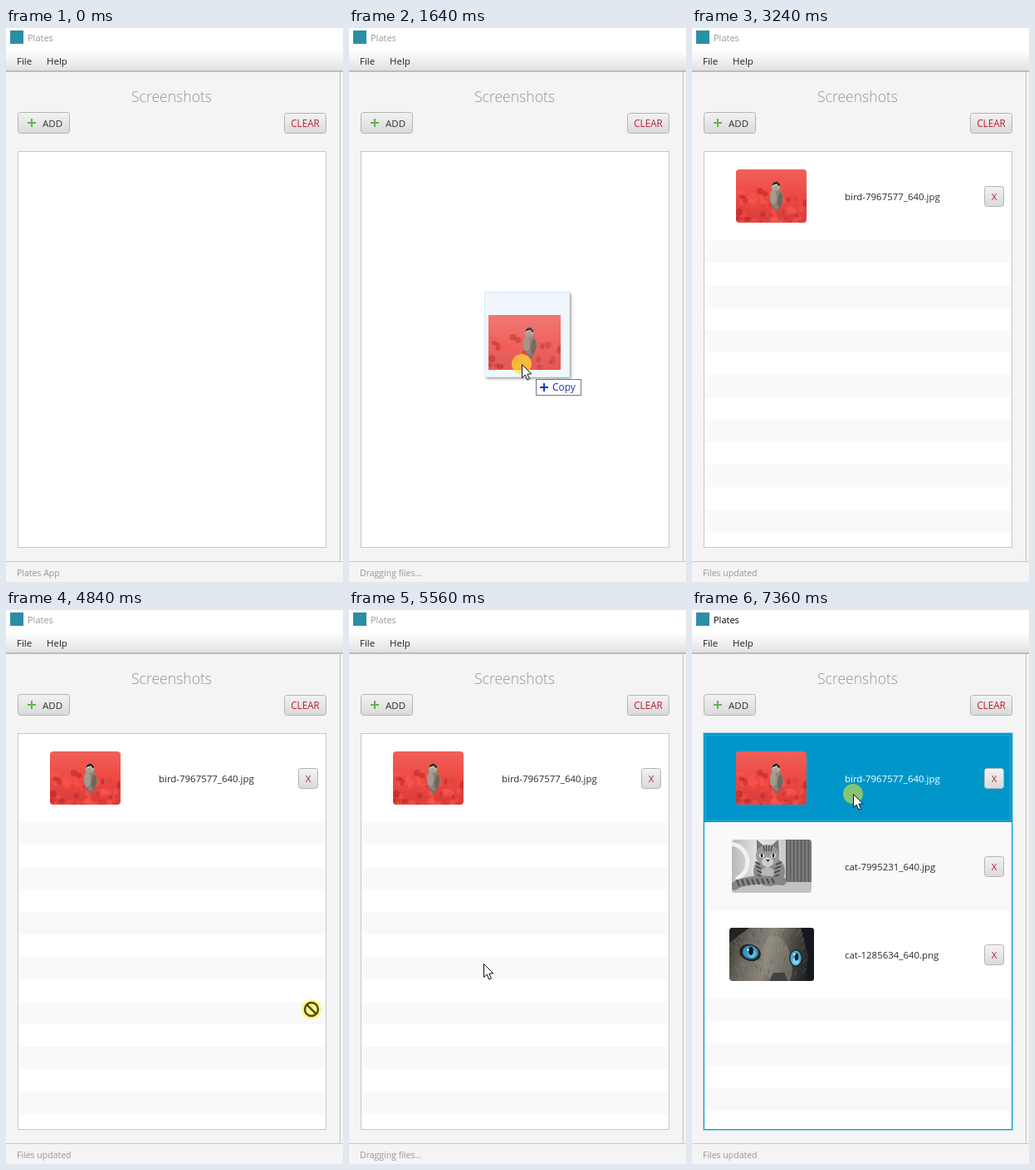
An HTML page with a canvas for the animation above (8 s loop, 406 by 666 pixels).

```html
<!DOCTYPE html>
<html lang="en">
<head>
<meta charset="utf-8">
<title>Screenshots panel</title>
<style>
html, body { margin: 0; width: 100%; height: 100%; overflow: hidden; background: #f4f4f4; }
canvas { display: block; width: 406px; height: 666px; }
</style>
</head>
<body>
<canvas id="stage" width="406" height="666"></canvas>
<script>
const ctx = document.getElementById('stage').getContext('2d');
const LOOP = 8000, STEP = 40;
const FONT = '"Open Sans", "Noto Sans", sans-serif';
const NAMES = ['bird-7967577_640.jpg', 'cat-7995231_640.jpg', 'cat-1285634_640.png'];

// Pointer path: time, x, y
const PATH = [
  [1400, 385, 394], [1480, 345, 390], [1560, 262, 397], [1640, 208, 404], [1680, 208, 404],
  [1800, 215, 400], [2480, 215, 400], [2520, 217, 397], [2560, 217, 397], [2720, 225, 390],
  [2880, 225, 390], [2960, 243, 384], [3080, 295, 390], [3200, 364, 407],
  [4840, 368, 480], [4880, 368, 480], [4920, 305, 468], [5080, 205, 432], [5160, 172, 420],
  [5240, 162, 425], [5880, 162, 425], [5960, 185, 401], [6120, 185, 401],
  [6760, 189, 311], [6800, 189, 311], [6960, 193, 245], [7000, 193, 245], [7160, 194, 221]
];

function pointer(t) {
  const i = PATH.findIndex(k => k[0] > t);
  if (i < 0) return PATH[PATH.length - 1].slice(1);
  if (i === 0) return PATH[0].slice(1);
  const a = PATH[i - 1], b = PATH[i], f = (t - a[0]) / (b[0] - a[0]);
  return [1, 2].map(n => Math.round(a[n] + (b[n] - a[n]) * f));
}

function rect(x, y, w, h, fill) {
  ctx.fillStyle = fill;
  ctx.fillRect(x, y, w, h);
}

function frame(x, y, w, h, color) {
  ctx.strokeStyle = color;
  ctx.lineWidth = 1;
  ctx.strokeRect(x + 0.5, y + 0.5, w - 1, h - 1);
}

function text(s, x, y, size, color, weight = 400, align = 'left') {
  ctx.font = `${weight} ${size}px ${FONT}`;
  ctx.textAlign = align;
  ctx.fillStyle = color;
  ctx.fillText(s, x, y);
}

function blob(x, y, rx, ry, fill, turn = 0) {
  ctx.fillStyle = fill;
  ctx.beginPath();
  ctx.ellipse(x, y, rx, ry, turn, 0, 7);
  ctx.fill();
}

function poly(points, fill) {
  ctx.fillStyle = fill;
  ctx.beginPath();
  for (let i = 0; i < points.length; i += 2) ctx.lineTo(points[i], points[i + 1]);
  ctx.closePath();
  ctx.fill();
}

function line(color, width, draw) {
  ctx.strokeStyle = color;
  ctx.lineWidth = width;
  ctx.beginPath();
  draw();
  ctx.stroke();
}

function shade(x0, y0, x1, y1, ...colors) {
  const g = ctx.createLinearGradient(x0, y0, x1, y1);
  colors.forEach((c, i) => g.addColorStop(i / (colors.length - 1), c));
  return g;
}

function seeded(seed) {
  return () => (seed = (seed * 16807) % 2147483647) / 2147483647;
}

function bird() {
  const rnd = seeded(71);
  rect(0, 0, 85, 64, shade(0, 0, 0, 64, '#f0605a', '#ee4942', '#d93b38'));
  for (let i = 0; i < 60; i++) {
    const y = 26 + rnd() * 40;
    blob(rnd() * 85, y, 2 + rnd() * 3, 2 + rnd() * 3, i % 3 ? 'rgba(250,90,80,.45)' : 'rgba(165,30,38,.45)');
  }
  poly([45, 43, 52, 43, 51, 51, 48, 51], '#77706a');
  blob(49, 35, 8, 12, '#8b8378');
  blob(45, 33, 4, 9, '#a39b90');
  blob(53, 37, 3, 9, '#6e665c', 0.1);
  blob(48, 21, 5.5, 5, '#a7a198');
  poly([43, 20, 45, 16, 49, 14.5, 53, 18, 52, 21, 47, 18], '#252321');
  line('#e8e2dc', 1.1, () => { ctx.moveTo(44, 20); ctx.lineTo(49, 18); ctx.lineTo(52, 22); });
}

function tabby() {
  rect(0, 0, 96, 64, shade(0, 0, 66, 0, '#b9b9b9', '#e6e6e6', '#c8c8c8'));
  line('#f1f1f1', 5, () => ctx.arc(-3, 27, 22, -1.5, 1.2));
  rect(65, 0, 31, 53, '#707070');
  for (let i = 0; i < 14; i++) {
    line(i % 2 ? '#858585' : '#595959', 1, () => { ctx.moveTo(66 + i * 2.2, 0); ctx.lineTo(66 + i * 2.2, 53); });
  }
  rect(0, 51, 96, 13, '#c2c2c2');
  blob(45, 38, 19, 18, '#8b8b8b');
  poly([30, 18, 30, 0, 39, 8, 47, 8, 56, 0, 57, 20], '#777');
  blob(43, 19, 14, 13, '#999');
  blob(43, 27, 7, 6, '#cdcdcd');
  blob(43, 40, 8, 7, '#b8b8b8');
  for (const x of [36, 50]) {
    blob(x, 19, 3.3, 2.6, '#dedede');
    blob(x, 19, 1.3, 2.2, '#161616');
  }
  poly([41, 24, 46, 24, 43.5, 27], '#333');
  for (let i = 0; i < 4; i++) {
    line('#444', 1.2, () => { ctx.moveTo(38 + i * 3.5, 7); ctx.lineTo(39.5 + i * 2.5, 14); });
    line('#444', 1.5, () => { ctx.moveTo(28 + i, 27 + i * 5); ctx.lineTo(34 + i, 30 + i * 5); });
    line('#444', 1.5, () => { ctx.moveTo(60 - i, 27 + i * 5); ctx.lineTo(53 - i, 30 + i * 5); });
  }
  ctx.lineCap = 'round';
  line('#858585', 10, () => { ctx.moveTo(3, 56); ctx.quadraticCurveTo(18, 45, 61, 50); });
  ctx.lineCap = 'butt';
  for (let i = 0; i < 8; i++) {
    line('#4a4a4a', 2, () => { ctx.moveTo(6 + i * 6, 48 - i * 0.2); ctx.lineTo(9 + i * 6, 56 - i * 0.5); });
  }
}

function eyes() {
  const rnd = seeded(29);
  rect(0, 0, 102, 64, shade(0, 0, 102, 30, '#38362f', '#6c685f', '#8a857b', '#4c4943', '#1e2022'));
  poly([0, 0, 24, 0, 0, 18], '#23231f');
  poly([86, 0, 102, 0, 102, 64, 92, 64, 95, 34], '#15191d');
  blob(58, 40, 17, 32, 'rgba(150,145,133,.5)', -0.2);
  for (let i = 0; i < 90; i++) {
    const x = rnd() * 92, y = rnd() * 64, dark = rnd() < 0.5;
    line(dark ? 'rgba(28,27,25,.4)' : 'rgba(190,184,170,.35)', 0.8,
      () => { ctx.moveTo(x, y); ctx.lineTo(x + (x - 52) * 0.1, y - 5); });
  }
  blob(25, 30, 13, 10, '#24231f', 0.3);
  blob(25.5, 29.5, 9.5, 8, '#3296c4', 0.2);
  blob(27, 31, 5, 5, '#5fc0e6');
  blob(26, 28, 3, 5, '#0c151b');
  blob(22.5, 26.5, 1.3, 1.3, '#e8f7ff');
  blob(80.5, 37, 8.5, 11, '#2b2b29', -0.1);
  blob(80, 36.5, 6.5, 9, '#48add9');
  blob(80, 40, 4, 4, '#83d2ee');
  blob(81, 35, 2.3, 4.5, '#10202a');
  blob(78.5, 32, 1.2, 1.2, '#fff');
  poly([48, 64, 53, 54, 67, 54, 70, 64], '#45413e');
}

const PHOTOS = [
  { draw: bird, x: 53, w: 85 },
  { draw: tabby, x: 48, w: 96 },
  { draw: eyes, x: 45, w: 102 }
];

function photo(p, x, y, w, h, radius) {
  ctx.save();
  ctx.beginPath();
  ctx.roundRect(x, y, w, h, radius);
  ctx.clip();
  ctx.translate(x, y);
  ctx.scale(w / p.w, h / 64);
  p.draw();
  ctx.restore();
}

function button(x, y, w, h) {
  ctx.fillStyle = shade(0, y, 0, y + h, '#f3f3f3', '#e6e6e6', '#d9d9d9');
  ctx.strokeStyle = '#b4b4b4';
  ctx.lineWidth = 1;
  ctx.beginPath();
  ctx.roundRect(x + 0.5, y + 0.5, w - 1, h - 1, 3);
  ctx.fill();
  ctx.stroke();
}

function plus(x, y, r, width, color) {
  line(color, width, () => {
    ctx.moveTo(x - r, y); ctx.lineTo(x + r, y);
    ctx.moveTo(x, y - r); ctx.lineTo(x, y + r);
  });
}

function windowChrome(active, status) {
  rect(0, 0, 406, 666, '#f4f4f4');
  rect(0, 0, 406, 28, '#fff');
  rect(5, 3, 16, 16, '#2b8fa3');
  text('Plates', 26, 16, 11, active ? '#000' : '#999');
  rect(0, 28, 406, 23, shade(0, 28, 0, 51, '#fdfdfd', '#f0f0f0', '#e1e1e1'));
  rect(0, 51, 406, 2, '#bdbdbd');
  text('File', 13, 44, 11.5, '#222');
  text('Help', 49, 44, 11.5, '#222');
  text('Screenshots', 199.5, 89, 17.6, '#959595', 300, 'center');
  button(14, 101, 63, 26);
  plus(31, 114, 5, 2, '#5fb54b');
  text('ADD', 44, 119, 11.5, '#333');
  button(335, 102, 51, 25);
  text('CLEAR', 360.5, 119, 11.7, '#bf1e36', 400, 'center');
  rect(402, 53, 1, 588, '#c3c3c3');
  rect(0, 641, 406, 1, '#c8c8c8');
  text(status, 13, 659, 10.5, '#969696');
}

function list(count, selected) {
  rect(14, 148, 372, 477, '#fff');
  for (let i = 0, y = 149; count && y < 624; i++) {
    const h = i < count ? 106 : 27;
    if (i % 2) rect(15, y, 370, Math.min(h, 624 - y), '#f9f9f9');
    y += h;
  }
  frame(14, 148, 372, 477, selected ? '#039ed3' : '#c8c8c8');
  if (selected) {
    ctx.strokeStyle = 'rgba(3,158,211,.35)';
    ctx.strokeRect(13.5, 147.5, 373, 478);
    rect(15, 149, 370, 106, '#0096c9');
    frame(16, 150, 368, 104, '#2aa6d2');
  }
  for (let i = 0; i < count; i++) {
    const y = 149 + i * 106, p = PHOTOS[i];
    photo(p, p.x, y + 21, p.w, 64, 4);
    text(NAMES[i], 184, y + 58, 11.45, selected && !i ? '#fff' : '#2b2b2b');
    button(352, y + 41, 24, 25);
    text('X', 364, y + 58, 11.5, '#bf1e36', 400, 'center');
  }
}

function ghost(x, y, p) {
  ctx.save();
  ctx.shadowColor = 'rgba(0,0,0,.4)';
  ctx.shadowBlur = 3;
  ctx.shadowOffsetX = ctx.shadowOffsetY = 1.5;
  rect(x - 45, y - 87, 103, 103, '#eff7fc');
  ctx.restore();
  frame(x - 45, y - 87, 103, 103, '#d6ecf8');
  ctx.globalAlpha = 0.84;
  photo(p, x - 40, y - 59, 87, 66, 0);
  ctx.globalAlpha = 1;
}

function copyTag(x, y) {
  rect(x + 17, y + 18, 55, 20, '#fff');
  frame(x + 17, y + 18, 55, 20, '#767676');
  plus(x + 27, y + 28, 5, 2, '#1c3fae');
  text('Copy', x + 37, y + 32, 11.9, '#1b35a8');
}

function arrow(x, y) {
  ctx.save();
  ctx.translate(x + 0.5, y + 0.5);
  poly([0, 0, 0, 16, 3.7, 12.6, 6.3, 18.5, 9, 17.4, 6.4, 11.7, 11.3, 11.3], '#fff');
  ctx.strokeStyle = '#111';
  ctx.lineWidth = 1;
  ctx.stroke();
  ctx.restore();
}

function denied(x, y) {
  line('#4b4a12', 2.4, () => {
    ctx.arc(x, y, 8, 0, 7);
    ctx.moveTo(x - 5.7, y - 5.7);
    ctx.lineTo(x + 5.7, y + 5.7);
  });
}

function render(t) {
  const within = (a, b) => t >= a && t < b;
  const active = t >= 7200;
  const count = t < 2240 ? 0 : t < 5640 ? 1 : 3;
  const dragging = within(1480, 2320) || within(4920, 5640);
  const status = dragging ? 'Dragging files...' : t < 1480 ? 'Plates App' : 'Files updated';
  windowChrome(active, status);
  list(count, active);

  if (t < 1400 || within(3240, 4840)) return;
  const [x, y] = pointer(t);
  const blocked = within(1400, 1480) || within(4840, 4920);
  const carrying = within(1480, 2240) || within(4920, 5560);
  if (carrying) ghost(x, y, PHOTOS[t < 3000 ? 0 : 1]);
  if (blocked || active || within(1480, 2120) || within(4920, 5520)) {
    blob(x, y, 12, 12, carrying ? 'rgba(255,225,50,.7)' : 'rgba(255,240,40,.53)');
  }
  if (blocked) denied(x, y);
  else arrow(x, y);
  if (carrying) copyTag(x, y);
}

function tick(now) {
  render(Math.floor((now % LOOP) / STEP) * STEP);
  requestAnimationFrame(tick);
}
requestAnimationFrame(tick);
</script>
</body>
</html>
```
